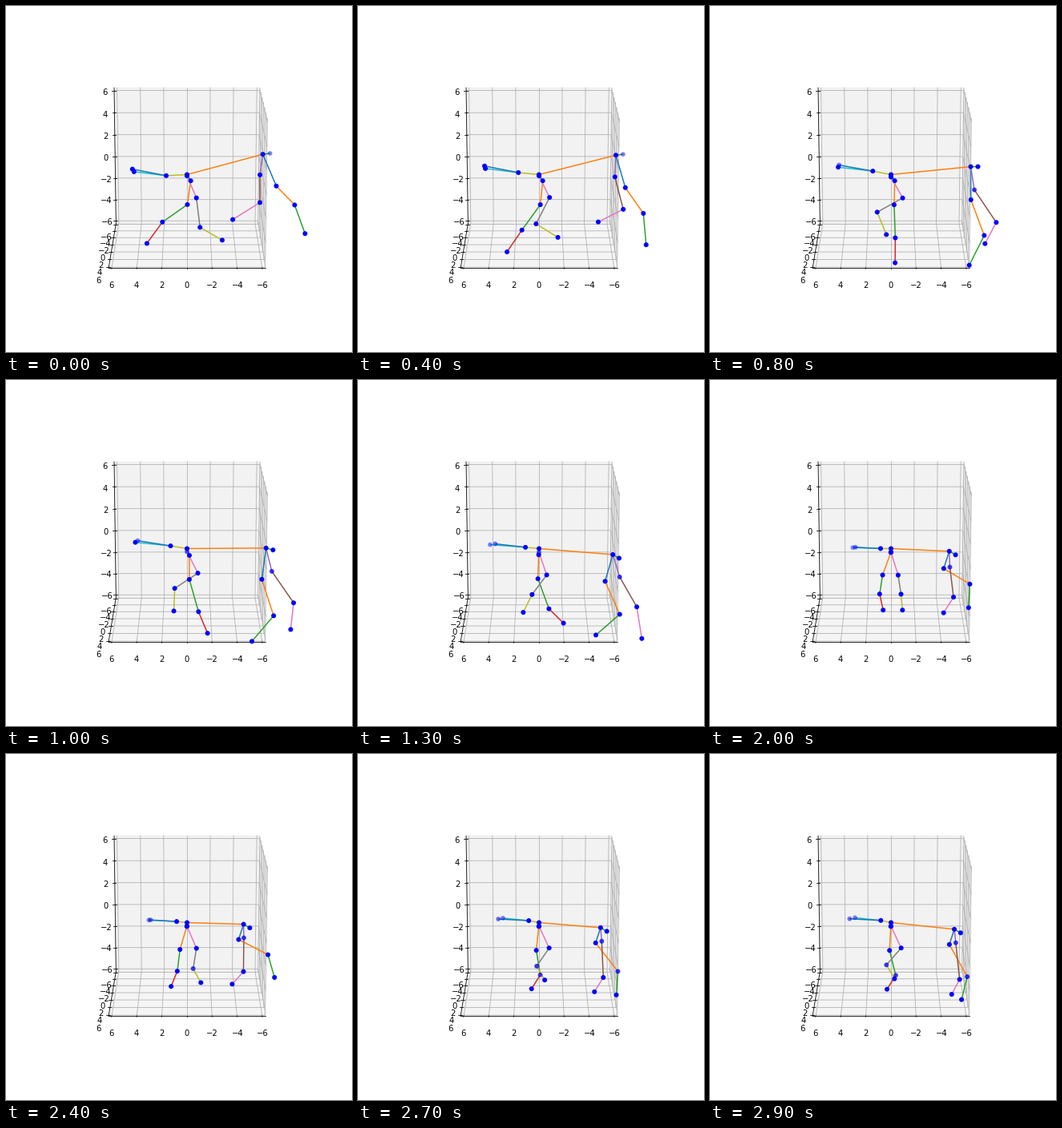
A matplotlib script that plays this animation: 432 px wide and 432 px high, repeating every 3 s.

```python
import numpy as np
import matplotlib.pyplot as plt
from matplotlib.animation import FuncAnimation

SIZE, FRAMES, INTERVAL = 432, 30, 100
ELEV, DIST = np.radians(15), 10
EDGE, LABEL = 6.25, 7.092          # pane and tick label distance from the centre
TICKS = range(-6, 7, 2)
STEPS = np.arange(FRAMES)

plt.rcParams["font.family"] = "DejaVu Sans"
fig = plt.figure(figsize=(6, 6), dpi=72, facecolor="white")
ax = fig.add_axes([0, 0, 1, 1])
ax.set_xlim(0, SIZE)
ax.set_ylim(SIZE, 0)
ax.axis("off")


def project(x, y, z):
    """Perspective view along the y axis, in pixels."""
    x, y, z = x / 12, y / 12, z / 12
    depth = DIST - y * np.cos(ELEV) - z * np.sin(ELEV)
    up = z * np.cos(ELEV) - y * np.sin(ELEV)
    return 225.92 - 1809.7 * x / depth, 210.51 - 1763 * up / depth


def path(*points, **style):
    xs, ys = zip(*(project(*p) for p in points))
    ax.plot(xs, ys, **style)


def pane(shade, *corners):
    color = (shade, shade, shade, 0.5)
    ax.add_patch(plt.Polygon([project(*c) for c in corners], closed=True,
                             facecolor=color, edgecolor=color, linewidth=1, zorder=0))


def label(value, *pos):
    ax.text(*project(*pos), str(value).replace("-", "\u2212"),
            fontsize=10, ha="center", va="top")


def draw_box():
    e, lab = EDGE, LABEL
    pane(0.95, (-e, -e, -e), (-e, e, -e), (-e, e, e), (-e, -e, e))
    pane(0.90, (-e, -e, -e), (e, -e, -e), (e, -e, e), (-e, -e, e))
    pane(0.925, (-e, -e, -e), (e, -e, -e), (e, e, -e), (-e, e, -e))

    grid = dict(color="#b0b0b0", linewidth=0.8, zorder=1)
    black = dict(color="black", linewidth=0.8, zorder=1.5)
    for t in TICKS:
        path((t, e, -e), (t, -e, -e), (t, -e, e), **grid)
        path((e, t, -e), (-e, t, -e), (-e, t, e), **grid)
        path((-e, e, t), (-e, -e, t), (e, -e, t), **grid)
        path((t, e - 0.1, -e), (t, e + 0.2, -e), **black)
        path((e - 0.1, t, -e), (e + 0.2, t, -e), **black)
        path((e - 0.1, -e, t), (e + 0.2, -e, t), **black)
        label(t, t, lab, -lab)
        label(t, lab, t, -lab)
        label(t, lab, -lab, t)
    path((e, e, -e), (-e, e, -e), **black)
    path((e, -e, -e), (e, e, -e), **black)
    path((e, -e, -e), (e, -e, e), **black)


def swing(*turns):
    """Cosine easing between turning points (step, value), held at both ends."""
    steps, values = np.array(turns).T
    seg = np.interp(STEPS, steps, np.arange(len(steps)))
    whole = np.floor(seg)
    eased = whole + (1 - np.cos(np.pi * (seg - whole))) / 2
    return np.interp(eased, np.arange(len(steps)), values)


joints = []


class Joint:
    """End of a bone; angle in degrees from straight down, to the right positive."""

    def __init__(self, parent, color, angle, length, fade=(0, 0, 1)):
        first, last, dim = fade
        self.parent, self.color = parent, color
        self.alpha = np.where((STEPS >= first) & (STEPS < last), dim, 1)
        turn = np.radians(angle)
        arm = length * (np.sin(turn) + 1j * np.cos(turn))
        self.track = arm + (parent.track if parent else 226 + 210.5j)
        joints.append(self)


root = Joint(None, None, 0, np.zeros(FRAMES))

# hind legs
hip = Joint(root, "C0", swing((8, 31), (13, -3)), swing((10, 9), (18, 4.8)))
knee = Joint(hip, "C1", swing((0, -8), (11, 0), (21.5, -21), (29, -3)), 30)
hock = Joint(knee, "C2", swing((0, -55), (12, 21), (22, -12), (29, 14)),
             swing((0, 38), (11, 42), (20, 24), (29, 32)), fade=(27, 30, 0.6))
Joint(hock, "C3", swing((3, -36), (14, 47), (27, -32)), swing((4, 33), (20, 20.5)))

hip = Joint(root, "C4", 0, swing((3, 1.5), (13, 4.5)), fade=(10, 16, 0.5))
knee = Joint(hip, "C6", swing((0, 23), (8, 29), (16, 14), (27, 25)), 30)
hock = Joint(knee, "C7", swing((0, 7), (8, -61), (20.5, 9), (29, -41)),
             swing((6, 37), (20, 24), (29, 28)), fade=(22, 30, 0.65))
Joint(hock, "C8", swing((3, 60), (14, -28), (25, 30)), swing((4, 32), (20, 20)))

# rear end
tail = Joint(root, "C8", swing((0, -87), (7, -101), (19, -90), (29, -102)),
             swing((3, 26), (19, 13)))
Joint(tail, "C9", swing((5, -97), (20, -92), (29, -96)),
      swing((0, 40.5), (12, 44.5), (23, 32.5)), fade=(11, 30, 0.35))
Joint(tail, "C0", swing((5, -101), (20, -93)),
      swing((7, 43), (20, 31.5), (29, 39)), fade=(6, 30, 0.4))

# front end
chest = Joint(root, "C1", swing((2.5, 105), (14, 85), (23.5, 88.4), (29, 84)),
              swing((0, 98), (8, 100), (23, 70), (29, 79.5)))
Joint(chest, "C2", swing((6, 97), (13, 60)), 9, fade=(0, 6, 0.35))

elbow = Joint(chest, "C0", swing((0, 23), (15, -18)), swing((0, 43), (6, 42), (24, 20)))
wrist = Joint(elbow, "C1", swing((0, 44), (10, 18), (23, 65), (29, 29)),
              swing((0, 33), (9, 48), (20, 38), (29, 46)), fade=(27, 30, 0.7))
Joint(wrist, "C2", swing((0, 20), (13, -49), (24, 16), (29, -14)),
      swing((0, 38), (10, 42), (20, 29.5)))

elbow = Joint(chest, "C4", swing((0, -8), (13, 17), (22, 0), (29, 6)),
              swing((0, 26), (11, 30), (24, 17)), fade=(6, 30, 0.65))
wrist = Joint(elbow, "C5", swing((0, 0), (9, 35), (25, -1), (29, 6)),
              swing((0, 34.5), (8, 49), (18, 37), (29, 46)))
Joint(wrist, "C6", swing((0, -58), (3, -65), (13, 9), (23, -43), (29, -28)),
      swing((0, 40), (8, 30), (13, 40), (22, 21)))

draw_box()
bones = [(j, ax.plot([], [], color=j.color, linewidth=1.5, zorder=3)[0])
         for j in joints if j.parent]
dots = ax.scatter([0] * len(joints), [0] * len(joints),
                  s=20, linewidths=1.5, color="blue", zorder=4)


def update(n):
    for joint, line in bones:
        ends = np.array([joint.parent.track[n], joint.track[n]])
        line.set_data(ends.real, ends.imag)
    spots = np.array([j.track[n] for j in joints])
    colors = [(0, 0, 1, j.alpha[n]) for j in joints]
    dots.set_offsets(np.column_stack([spots.real, spots.imag]))
    dots.set_facecolor(colors)
    dots.set_edgecolor(colors)
    return [line for _, line in bones] + [dots]


anim = FuncAnimation(fig, update, frames=FRAMES, interval=INTERVAL,
                     init_func=lambda: update(0), repeat=True, repeat_delay=0)
plt.show()
```
